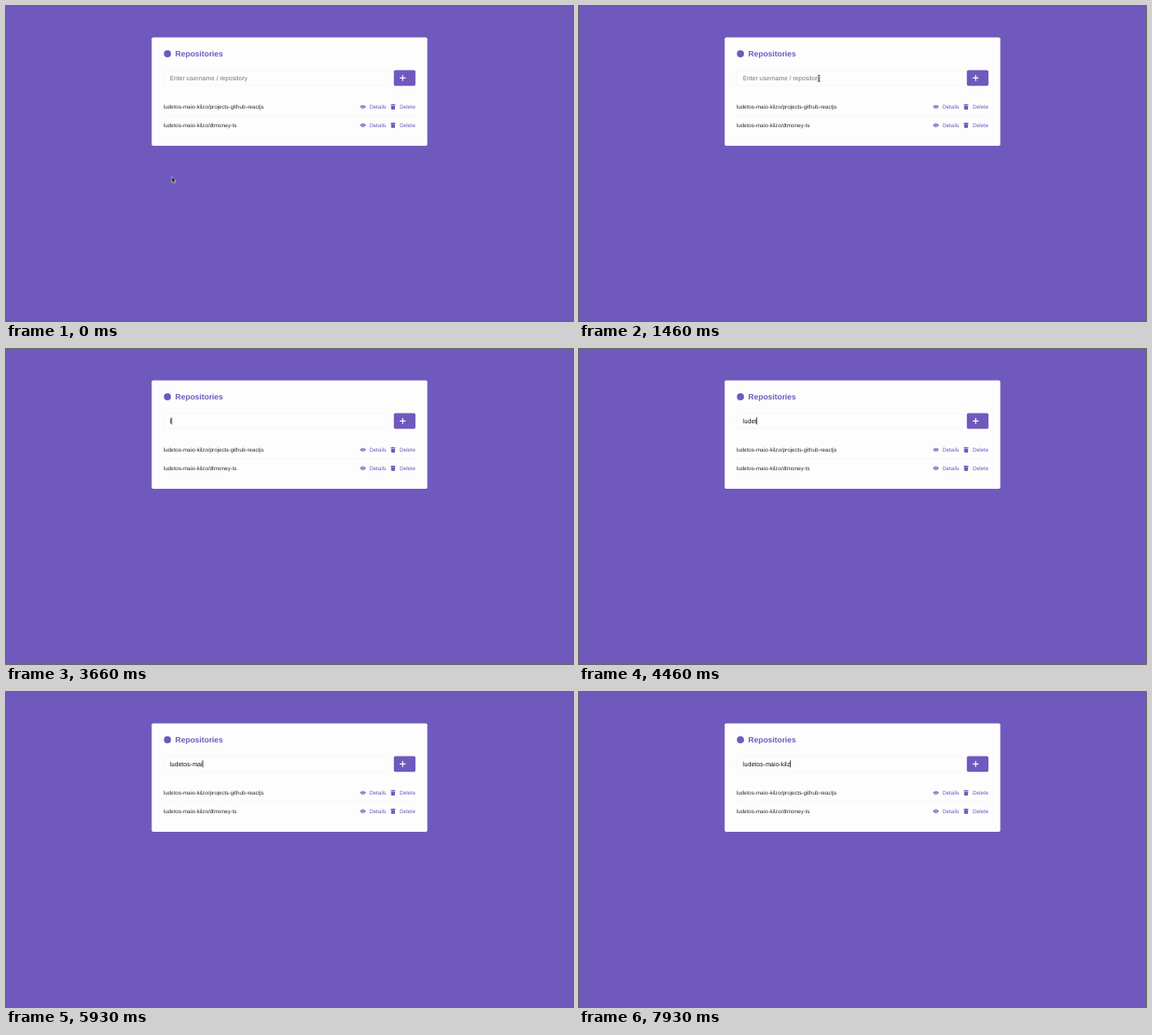
An HTML page that plays this animation: 640x356 px, repeating every 8 s.

```html
<!DOCTYPE html>
<html lang="en">
<head>
<meta charset="utf-8">
<title>Repositories</title>
<style>
  :root { --purple: #6f59bd; }
  html, body { margin: 0; width: 100%; height: 100%; overflow: hidden; background: var(--purple); }
  svg { display: block; width: 100vw; height: 100vh; }
  text { font-family: "Liberation Sans", Arial, sans-serif; font-size: 14px; fill: #2b2b2b; white-space: pre; text-rendering: geometricPrecision; }
  .purple { fill: var(--purple); }
  .title { font-size: 20px; font-weight: bold; fill: var(--purple); }
  .field { font-size: 16px; fill: #111; }
  .hint { fill: #757575; }
  .line { fill: none; stroke: #eee; }
</style>
</head>
<body>
<svg viewBox="0 0 1440 801">
  <defs>
    <g id="eye">
      <path class="purple" d="M-7.5 0Q0-10 7.5 0Q0 10-7.5 0Z"/>
      <circle r="3.5" fill="#fdfdfd"/>
      <circle class="purple" r="2.3"/>
    </g>
    <path id="trash" class="purple" d="M-6-6H-2.5L-1.8-7H1.8L2.5-6H6V-4.2H-6ZM-5.3-3.3H5.3L4.7 5.7Q4.6 7 3.4 7H-3.4Q-4.6 7-4.7 5.7Z"/>
    <g id="actions">
      <use href="#eye" x="906.5" y="-4.5"/>
      <text class="purple" x="922.8">Details</text>
      <use href="#trash" x="983" y="-4.5"/>
      <text class="purple" x="999.5">Delete</text>
    </g>
  </defs>

  <rect x="370" y="80" width="700" height="275.5" rx="4" fill="#fdfdfd"/>
  <circle class="purple" cx="410" cy="121.5" r="9"/>
  <text class="title" x="430" y="128">Repositories</text>

  <rect class="line" x="400.5" y="163.5" width="574" height="39" rx="4"/>
  <text class="field hint" id="hint" x="416" y="188.5">Enter username / repository</text>
  <text class="field" id="typed" x="416" y="188.5"></text>
  <rect id="caret" y="174" width="1.8" height="18" fill="#111"/>

  <rect class="purple" x="985" y="163" width="55" height="40" rx="4"/>
  <path d="M1001 183H1014M1007.5 176.5V189.5" stroke="#fff" stroke-width="2.6" stroke-linecap="round"/>

  <text x="400" y="260.7">ludetos-maio-kilzo/projects-github-reactjs</text>
  <use href="#actions" y="260.7"/>
  <path class="line" d="M400 279.5H1040"/>
  <text x="400" y="307.7">ludetos-maio-kilzo/dtmoney-ts</text>
  <use href="#actions" y="307.7"/>

  <g id="pointer">
    <path id="arrow" d="M0 0V15L3.5 11.8L6 17.2L8.6 16L6.2 10.8H11Z" fill="#111" stroke="#fff" stroke-width="1.2"/>
    <path id="beam" d="M-3.5-8Q0-8 0-6Q0-8 3.5-8M0-6V6M-3.5 8Q0 8 0 6Q0 8 3.5 8" fill="none" stroke="#222" stroke-width="1.7"/>
  </g>
</svg>
<script>
const LOOP = 8000, TICK = 1000 / 15, BLINK = 535;
const FOCUS = 1730;
const USER = "ludetos-maio-kilz";
const KEYS = [3530, 3730, 3930, 4130, 4460, 4530, 4600, 5130, 5530,
              5730, 5930, 6260, 6660, 7060, 7260, 7460, 7930];

// Pointer stops: tick, x, y
const STOPS = [[0, 421, 434], [13, 727, 115], [22, 609.5, 184]];
// Areas that show the text pointer: left, top, right, bottom
const TEXT_AREAS = [[400, 163, 975, 203], [400, 248, 655, 264], [400, 295, 587, 311]];

const el = id => document.getElementById(id);
const show = (id, on) => el(id).setAttribute("visibility", on ? "visible" : "hidden");
const ease = p => p * p * (3 - 2 * p);

function pointerAt(t) {
  const tick = Math.min(Math.floor((t + 7) / TICK), 22);
  const i = tick < 13 ? 0 : 1;
  const [t0, x0, y0] = STOPS[i], [t1, x1, y1] = STOPS[i + 1];
  const p = ease((tick - t0) / (t1 - t0));
  return [x0 + (x1 - x0) * p, y0 + (y1 - y0) * p];
}

function draw(t) {
  const count = KEYS.filter(k => k <= t).length;
  const typing = count > 0;
  el("typed").textContent = USER.slice(0, count);
  show("hint", !typing);

  const since = t - (typing ? KEYS[count - 1] : FOCUS);
  show("caret", since >= 0 && Math.floor(since / BLINK) % 2 === 0);
  el("caret").setAttribute("x", 416 + (typing ? el("typed").getComputedTextLength() : 0));

  const [x, y] = pointerAt(t);
  const overText = TEXT_AREAS.some(([l, a, r, b]) => x >= l && x <= r && y >= a && y <= b);
  el("pointer").setAttribute("transform", `translate(${x} ${y})`);
  show("arrow", !typing && !overText);
  show("beam", !typing && overText);
}

const start = performance.now();
function frame() {
  draw((performance.now() - start) % LOOP);
  requestAnimationFrame(frame);
}
frame();
</script>
</body>
</html>
```
